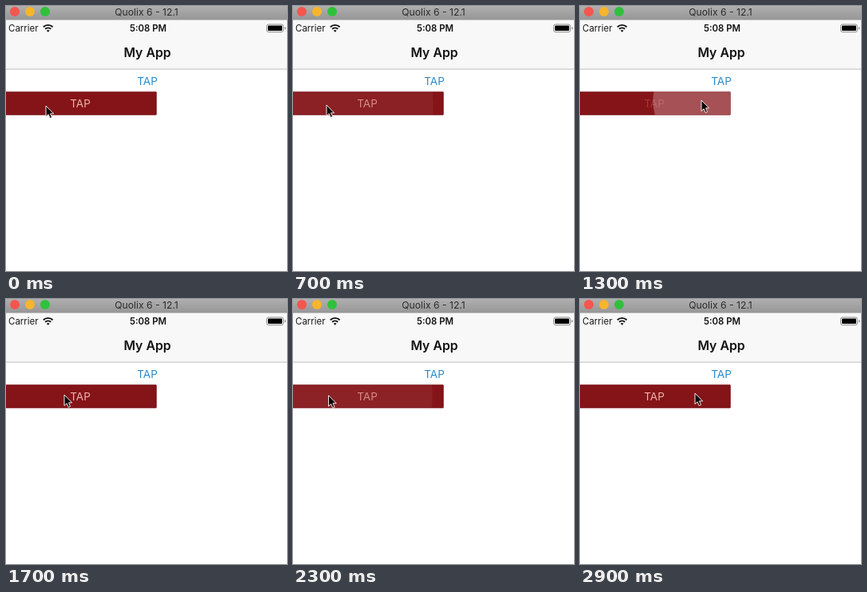
Write an HTML page that moves like this. It is 352 by 332 pixels and loops after 3 s.

```html
<!DOCTYPE html>
<html lang="en">
<head>
<meta charset="utf-8">
<title>Ripple button</title>
<style>
  html, body { margin: 0; width: 100%; height: 100%; overflow: hidden; background: #fff; }
  svg { display: block; width: 352px; height: 332px; font-family: Inter, Roboto, sans-serif; }
  text { text-anchor: middle; }
</style>
</head>
<body>
<svg viewBox="0 0 352 332">
  <defs>
    <linearGradient id="chrome" x2="0" y2="1">
      <stop offset="0" stop-color="#afafaf"/>
      <stop offset="1" stop-color="#969696"/>
    </linearGradient>
    <clipPath id="clip"><rect y="107.5" width="188.5" height="29"/></clipPath>
  </defs>

  <rect width="352" height="332" fill="#fff"/>
  <rect y="17" width="352" height="62" fill="#f8f8f8"/>
  <rect y="78.6" width="352" height="1" fill="#bdbdbd"/>

  <rect width="352" height="17.5" fill="url(#chrome)"/>
  <circle cx="11" cy="7" r="6" fill="#f5564f"/>
  <circle cx="30" cy="7" r="6" fill="#f7b52c"/>
  <circle cx="49" cy="7" r="6" fill="#2fc13c"/>
  <text x="176" y="12" font-size="12.2" fill="#2c2c2c">Quolix 6 - 12.1</text>

  <text x="3" y="32" font-size="11.5" fill="#1c1c1c" style="text-anchor:start">Carrier</text>
  <g fill="none" stroke="#111" stroke-width="1.9">
    <path d="M46.8 26.2a8.6 8.6 0 0 1 11.8 0"/>
    <path d="M49.1 28.8a5.3 5.3 0 0 1 7.2 0"/>
  </g>
  <path d="M50.8 30.8a2.9 2.9 0 0 1 3.8 0L52.7 32.8Z" fill="#111"/>
  <text x="178" y="32" font-size="11.4" font-weight="600" fill="#111">5:08 PM</text>
  <rect x="326.5" y="23" width="21" height="9.6" rx="2.4" fill="none" stroke="#8c8c8c"/>
  <rect x="328" y="24.5" width="18" height="6.6" rx="1" fill="#000"/>
  <path d="M349 26v3.6q1.6-.6 1.6-1.8t-1.6-1.8Z" fill="#8c8c8c"/>

  <text x="177" y="64" font-size="15.8" font-weight="600" fill="#111">My App</text>
  <text x="177" y="98.7" font-size="13.6" fill="#2b8bc9">TAP</text>

  <rect y="107.5" width="188.5" height="29" fill="#851419"/>
  <path d="M0 108H188V136H0" fill="none" stroke="#761016"/>
  <text id="label" x="93" y="127.2" font-size="13.6" fill="#eeb1aa">TAP</text>
  <g clip-path="url(#clip)"><circle id="ripple" fill="#fff"/></g>

  <path id="cursor" d="M0 0V13.6L3.1 10.8 5.2 15.6 7.6 14.6 5.5 9.9H9.7Z"
        fill="#0c0808" stroke="#f4e8e6" stroke-width="1" stroke-linejoin="round"/>
</svg>
<script>
  const LOOP = 3000, STEP = 100, DURATION = 400;
  const el = id => document.getElementById(id);
  const clamp = v => Math.max(0, Math.min(1, v));
  const smooth = v => v * v * (3 - 2 * v);

  // Pointer stops: time, x, y
  const stops = [
    [0, 50, 125], [400, 42, 124], [750, 42, 124], [1150, 152, 118],
    [1400, 152, 118], [1700, 73, 120], [1900, 44, 120], [2200, 44, 120],
    [2500, 46, 123], [2900, 144, 118], [3000, 144, 118]
  ];
  // Presses: time, x, y
  const taps = [[405, 42, 124], [1200, 152, 119], [2010, 44, 121]];

  function pointer(t) {
    const i = stops.findIndex((s, n) => n && t <= s[0]);
    const [t0, x0, y0] = stops[i - 1], [t1, x1, y1] = stops[i];
    const k = smooth((t - t0) / (t1 - t0));
    return [x0 + (x1 - x0) * k, y0 + (y1 - y0) * k];
  }

  function draw(t) {
    el('cursor').setAttribute('transform', `translate(${pointer(t)})`);

    const tap = taps.find(([at]) => t >= at && t < at + DURATION);
    const ripple = el('ripple');
    if (!tap) {
      ripple.setAttribute('opacity', 0);
      el('label').setAttribute('opacity', 1);
      return;
    }
    const [at, x, y] = tap;
    const u = (t - at) / DURATION;
    const p = 1 - Math.pow(1 - u, 1.75);
    const reach = Math.hypot(Math.max(x, 188.5 - x), 20);
    ripple.setAttribute('cx', x);
    ripple.setAttribute('cy', y);
    ripple.setAttribute('r', reach * p);
    ripple.setAttribute('opacity', 0.26 * Math.min(1, p / 0.25, (1 - p) / 0.5));
    el('label').setAttribute('opacity', 1 - 0.82 * Math.min(clamp(u * 5), clamp((1 - u) * 1.25)));
  }

  function tick() {
    const t = performance.now() % LOOP;
    draw(Math.floor(t / STEP) * STEP);
    requestAnimationFrame(tick);
  }
  tick();
</script>
</body>
</html>
```
